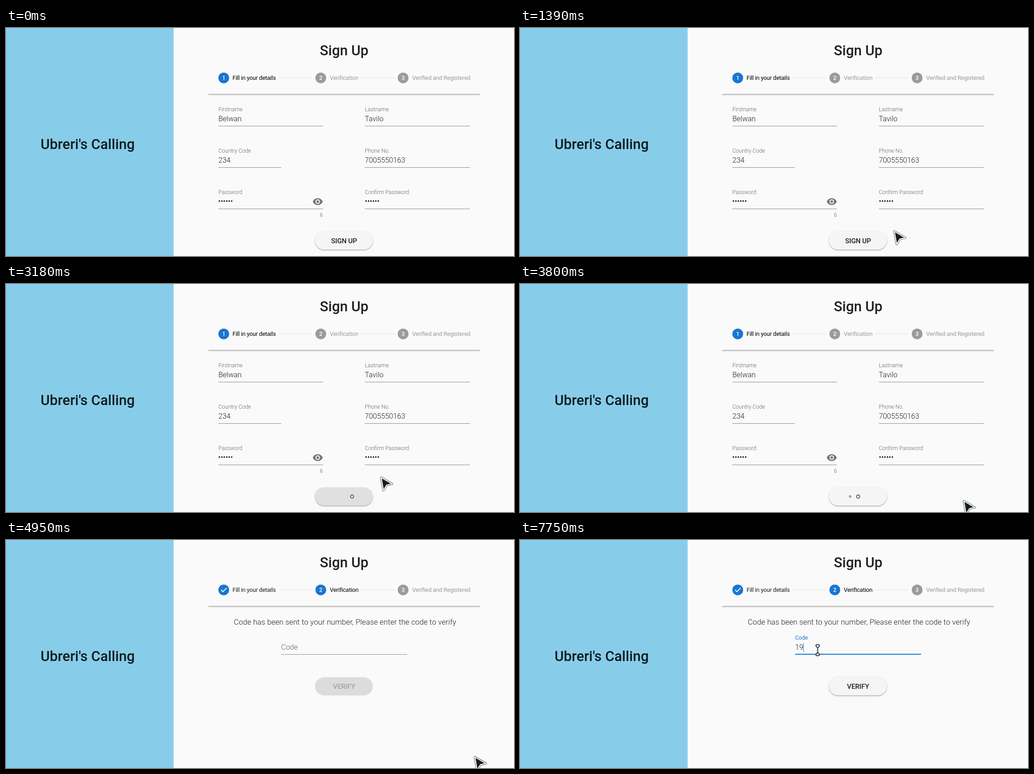
Write an HTML page that moves like this. It is 1117 by 501 pixels and loops after 8000 ms.

```html
<!DOCTYPE html>
<html lang="en">
<head>
<meta charset="utf-8">
<title>Sign Up</title>
<style>
html, body { margin: 0; width: 100%; height: 100%; overflow: hidden; background: #fafafa; }
svg { display: block; width: 1117px; height: 501px; font-family: Roboto, sans-serif; }
text { fill: rgba(0,0,0,.87); font-size: 16px; font-weight: 300; white-space: pre; }
.stepper { position: absolute; left: 444px; top: 73px; width: 599px; height: 90px; overflow: hidden; pointer-events: none; }
.stepper div { height: 72px; box-shadow: 0 3px 1px -2px rgba(0,0,0,.2), 0 2px 2px rgba(0,0,0,.14), 0 1px 5px rgba(0,0,0,.12); }
.title { font-size: 31px; font-weight: 500; }
.mid { text-anchor: middle; }
.num { font-size: 12px; font-weight: 500; fill: #fff; text-anchor: middle; }
.step { font-size: 13px; font-weight: 400; letter-spacing: -.26px; }
.idle { fill: rgba(0,0,0,.38); }
.active { fill: #000; }
.note { font-size: 12px; fill: rgba(0,0,0,.6); }
.line { fill: rgba(0,0,0,.46); }
.btn { font-size: 15px; font-weight: 500; text-anchor: middle; letter-spacing: -.1px; }
.raised { fill: #f5f5f5; filter: drop-shadow(0 1px .5px rgba(0,0,0,.2)) drop-shadow(0 1px 1px rgba(0,0,0,.14)) drop-shadow(0 1px 2px rgba(0,0,0,.1)); }
.blue { fill: #1976d2; }
.grey { fill: #9b9b9b; }
.halo { stroke: #3c4a4c; stroke-opacity: .6; stroke-width: 4.4; stroke-linejoin: round; fill: none; filter: drop-shadow(0 0 1px rgba(40,60,60,.4)); }
.rim { stroke: #fff; stroke-width: 2; stroke-linejoin: round; fill: #171d1f; }
.skin { stroke: #22323a; stroke-width: 1.8; stroke-linejoin: round; fill: #fff; }
</style>
</head>
<body>
<svg viewBox="0 0 1117 501">
  <defs>
    <clipPath id="body"><rect x="444" y="145" width="599" height="356"/></clipPath>
  </defs>
  <rect width="1117" height="501" fill="#fafafa"/>
  <rect width="368.6" height="501" fill="#87cdea"/>
  <text class="title" x="76" y="266">Ubreri's Calling</text>
  <text class="title mid" x="743.5" y="60">Sign Up</text>

  <g fill="#000" fill-opacity=".12">
    <rect x="602" y="109" width="70" height="1"/>
    <rect x="782" y="109" width="72" height="1"/>
  </g>
  <circle class="blue" cx="478.8" cy="109.7" r="11.8"/>
  <text class="num" id="one" x="478.8" y="114">1</text>
  <path id="check" d="M473 109.8l3.9 3.8 8.2-8.3" fill="none" stroke="#fff" stroke-width="1.9"/>
  <text class="step" id="label1" x="498" y="114">Fill in your details</text>
  <circle id="dot2" cx="692.2" cy="109.7" r="11.8"/>
  <text class="num" x="692.2" y="114">2</text>
  <text class="step" id="label2" x="712" y="114">Verification</text>
  <circle class="grey" cx="873.2" cy="109.7" r="11.8"/>
  <text class="num" x="873.2" y="114">3</text>
  <text class="step idle" x="893" y="114">Verified and Registered</text>

  <g clip-path="url(#body)">
    <g id="details">
      <text class="note" x="467" y="183">Firstname</text>
      <text x="467" y="205">Belwan</text>
      <rect class="line" x="467" y="215" width="230" height="1"/>
      <text class="note" x="789" y="183">Lastname</text>
      <text x="789" y="205">Tavilo</text>
      <rect class="line" x="789" y="215" width="231" height="1"/>
      <text class="note" x="467" y="274">Country Code</text>
      <text x="467" y="296">234</text>
      <rect class="line" x="467" y="306" width="138" height="1"/>
      <text class="note" x="789" y="274">Phone No.</text>
      <text x="789" y="296">7005550163</text>
      <rect class="line" x="789" y="306" width="231" height="1"/>
      <text class="note" x="467" y="365">Password</text>
      <text class="step" x="466.5" y="386" style="font-size:16px;letter-spacing:0">••••••</text>
      <rect class="line" x="467" y="397" width="230" height="1"/>
      <path transform="translate(673.5 369.5)" fill="#757575" d="M12 4.5C7 4.5 2.73 7.61 1 12c1.73 4.39 6 7.5 11 7.5s9.27-3.11 11-7.5c-1.73-4.39-6-7.5-11-7.5zM12 17c-2.76 0-5-2.24-5-5s2.24-5 5-5 5 2.24 5 5-2.24 5-5 5zm0-8c-1.66 0-3 1.34-3 3s1.34 3 3 3 3-1.34 3-3-1.34-3-3-3z"/>
      <text class="note" x="697" y="415" text-anchor="end">6</text>
      <text class="note" x="789" y="365">Confirm Password</text>
      <text class="step" x="789" y="386" style="font-size:16px;letter-spacing:0">••••••</text>
      <rect class="line" x="789" y="397" width="231" height="1"/>
      <rect class="raised" x="679.5" y="447" width="127" height="40" rx="20"/>
      <rect id="hover" x="679.5" y="447" width="127" height="40" rx="20"/>
      <text class="btn" id="signup" x="743.4" y="472.5">SIGN UP</text>
      <g id="loader" fill="none" stroke="#56636b">
        <circle cx="726" cy="467"/><circle cx="743.5" cy="467"/><circle cx="761" cy="467"/>
      </g>
    </g>
    <g id="verify">
      <text class="mid" x="745.5" y="186" style="font-size:16.5px;letter-spacing:.14px">Code has been sent to your number, Please enter the code to verify</text>
      <text id="code" x="605" y="241">Code</text>
      <text id="typed" x="605" y="241"></text>
      <rect id="caret" class="blue" y="227" width="1" height="19"/>
      <rect id="base" x="605" y="251" width="277" height="1"/>
      <rect id="focus" class="blue" y="250" height="2"/>
      <rect x="679.5" y="301.5" width="127" height="40" rx="20" fill="#dcdcdc"/>
      <text class="btn" x="743.4" y="327" style="fill:rgba(0,0,0,.26)">VERIFY</text>
      <g id="ready">
        <rect class="raised" x="679.5" y="301.5" width="127" height="40" rx="20"/>
        <text class="btn" x="743.4" y="327">VERIFY</text>
      </g>
    </g>
  </g>

  <g id="cursor">
    <g id="arrow">
      <path class="halo" d="M1 1L25 15 13.500 17.500 6 29z"/>
      <path class="rim" d="M1 1L25 15 13.500 17.500 6 29z"/>
    </g>
    <g id="hand">
      <circle id="press" r="11.5" fill="#f0e94e" fill-opacity=".92"/>
      <path class="skin" d="M-2 2Q.5-2 3 2V9L13 11Q15.500 12 14.500 16L11 21H-1L-7 14Q-7 10.500-4 11.500L-2 14z"/>
      <path d="M3 10v4M7 10.500v4M11 11v4" stroke="#22323a"/>
      <rect x="-1.500" y="20" width="13.500" height="6.500" rx="1" fill="#1d2b30"/>
    </g>
    <g id="beam">
      <path d="M0-9V9" stroke="#26434f" stroke-width="2"/>
      <path class="skin" d="M-4-11Q0-14 4-11 4-8 0-5-4-8-4-11zM-4 11Q0 14 4 11 4 8 0 5-4 8-4 11z"/>
    </g>
  </g>
</svg>
<div class="stepper"><div></div></div>
<script>
const LOOP = 8000, TICK = 76.6;
const el = {};
document.querySelectorAll('[id]').forEach(n => el[n.id] = n);
const dots = [...el.loader.children];

// moments where the screen starts a new run of ticks
const runs = [0, 460, 2650, 5740, 6140, 6660, 7220, 7360, 7670];

// pointer positions: time, x, y
const path = [
  [460, 1013, 486], [610, 965, 408], [690, 917, 360], [845, 838, 338],
  [1000, 765, 373], [1076, 754, 392], [1153, 808, 424], [1226, 840, 430],
  [1303, 832, 438], [1380, 822, 446], [1540, 800, 456], [1850, 788, 460],
  [3000, 788, 460], [3110, 824, 424], [3190, 862, 398], [3270, 903, 437],
  [3420, 950, 465], [3800, 975, 476], [4260, 1005, 474], [4950, 1030, 476],
  [5100, 1030, 480], [5180, 1027, 486], [5330, 1025, 510],
  [5740, 965, 488], [5816, 800, 310], [5893, 670, 225], [5965, 608, 294],
  [6139, 608, 294], [6140, 668, 247], [6293, 659, 244], [6369, 654.5, 242]
];

const clamp = v => Math.max(0, Math.min(1, v));
const span = (t, from, ms) => clamp((t - from) / ms);
const ease = p => 1 - (1 - p) ** 3;
const set = (n, attrs) => { for (const k in attrs) n.setAttribute(k, attrs[k]); };
const show = (n, on) => n.style.display = on ? '' : 'none';

function snap(t) {
  const start = runs.filter(r => r <= t).pop();
  return start + Math.floor((t - start + 4) / TICK) * TICK;
}

function pointAt(t) {
  const i = path.findIndex(k => k[0] > t);
  if (i < 0) return path[path.length - 1].slice(1);
  if (i === 0) return path[0].slice(1);
  const [a, b] = [path[i - 1], path[i]], p = span(t, a[0], b[0] - a[0]);
  return [a[1] + (b[1] - a[1]) * p, a[2] + (b[2] - a[2]) * p];
}

function drawPointer(t) {
  const [x, y] = pointAt(t);
  set(el.cursor, { transform: `translate(${x} ${y})` });
  const hand = t >= 1530 && t < 3080, beam = t >= 6140;
  show(el.cursor, t >= 460 && !(t > 5325 && t < 5740));
  show(el.hand, hand);
  show(el.beam, beam);
  show(el.arrow, !hand && !beam);
  show(el.press, t >= 2650 && t < 2870);
}

function drawSteps(t) {
  const done = t >= 4480;
  show(el.one, !done);
  show(el.check, done);
  el.label1.setAttribute('class', done ? 'step' : 'step active');
  el.label2.setAttribute('class', done ? 'step active' : 'step idle');
  el.dot2.setAttribute('class', done ? 'blue' : 'grey');
  const p = ease(span(t, 4480, 320));
  set(el.details, { transform: `translate(${-599 * p} 0)` });
  set(el.verify, { transform: `translate(${599 * (1 - p)} 0)` });
  show(el.details, p < 1);
  show(el.verify, p > 0);
}

function drawDetails(t) {
  const over = span(t, 1500, 300) - span(t, 3040, 300), busy = t >= 2950;
  set(el.hover, { 'fill-opacity': .11 * over });
  show(el.signup, !busy);
  show(el.loader, busy);
  dots.forEach((dot, i) => {
    const a = (t - 3800) / 1000 * 2 * Math.PI + (150 - 75 * i) * Math.PI / 180;
    const r = 3.7 * Math.max(0, Math.sin(a));
    set(dot, { r, 'stroke-width': .5 + r * .4 });
  });
}

function drawVerify(t) {
  const p = ease(span(t, 6630, 320)), focused = t >= 6660;
  set(el.code, { y: 241 - 22 * p });
  el.code.style.fontSize = 16 - 4 * p + 'px';
  el.code.style.fontWeight = focused ? 400 : 300;
  el.code.style.fill = focused ? '#1976d2' : 'rgba(0,0,0,.6)';
  set(el.base, { 'fill-opacity': t >= 6140 ? .6 : .44 });
  set(el.focus, { x: 743.5 - 138.5 * p, width: 277 * p });
  const count = (t >= 7360) + (t >= 7670);
  el.typed.textContent = '19'.slice(0, count);
  set(el.caret, { x: 605 + 9 * count });
  show(el.caret, focused && !(t >= 7220 && t < 7360));
  set(el.ready, { opacity: span(t, 7300, 220) });
}

function frame() {
  const t = snap(performance.now() % LOOP);
  drawPointer(t);
  drawSteps(t);
  drawDetails(t);
  drawVerify(t);
  requestAnimationFrame(frame);
}
frame();
</script>
</body>
</html>
```
